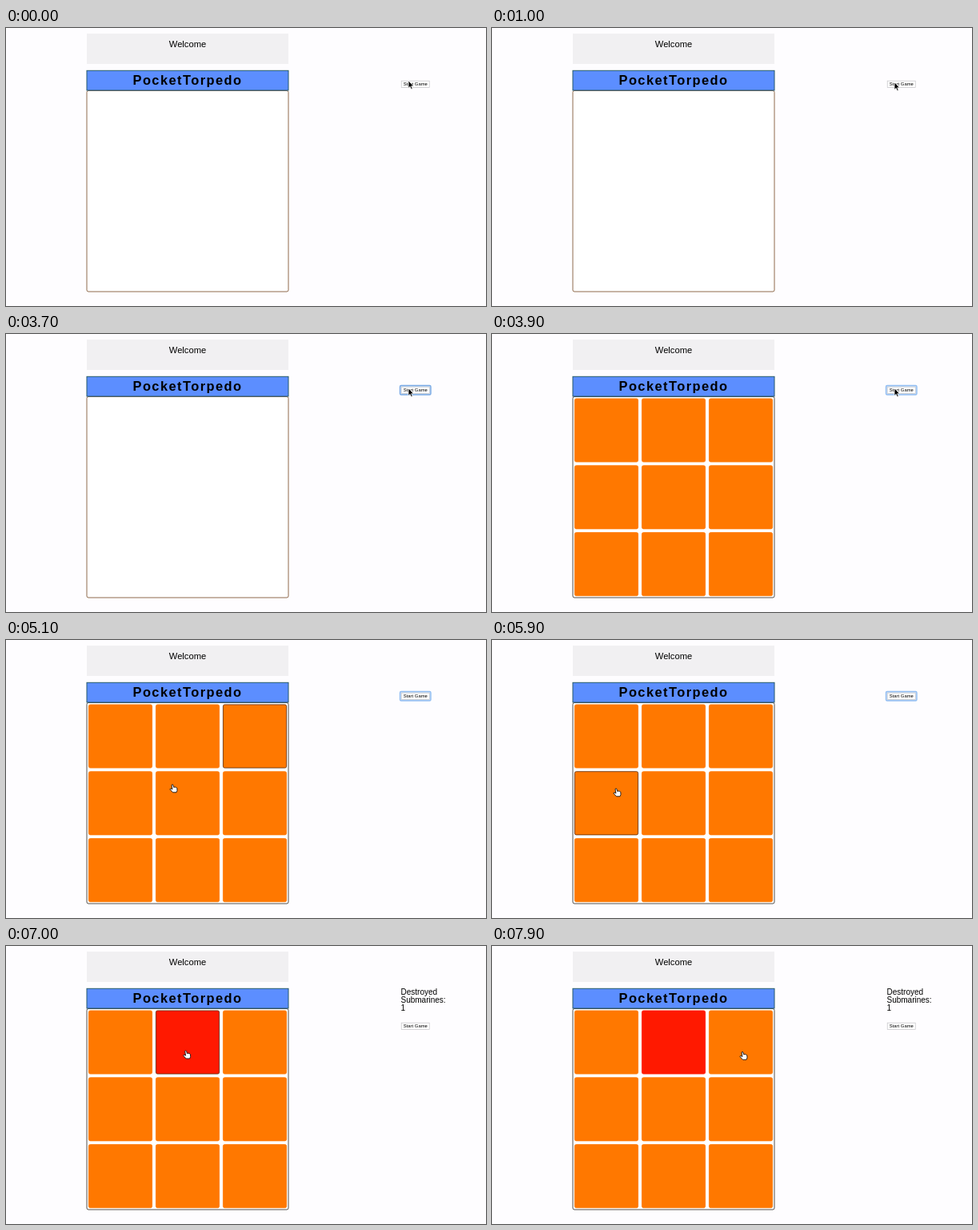
An HTML page for the animation above (8000 ms loop, 600 by 348 pixels).

```html
<!DOCTYPE html>
<html lang="en">
<head>
<meta charset="utf-8">
<title>Grid game</title>
<style>
html, body { margin: 0; width: 100%; height: 100%; overflow: hidden; background: #fefdff; }
svg { display: block; width: 600px; height: 348px; }
text { font-family: "Liberation Sans", Arial, sans-serif; fill: #000; }
</style>
</head>
<body>
<svg viewBox="0 0 600 348">
  <rect width="600" height="348" fill="#fefdff"/>
  <rect x="101" y="7" width="252" height="38" fill="#f1f0f2"/>
  <text x="227" y="24.4" font-size="11.2" text-anchor="middle">Welcome</text>
  <rect id="board" x="101" y="78.5" width="252" height="251.5" rx="2" fill="#fff"/>
  <rect x="101" y="53.3" width="252" height="24.7" fill="#5c8eff" stroke="#24596a"/>
  <text x="158.5" y="71" font-size="16.4" font-weight="bold" letter-spacing="1.45">PocketTorpedo</text>
  <g id="cells"></g>
  <g id="score" font-size="10">
    <text x="493.5" y="61">Destroyed</text>
    <text x="493.5" y="71">Submarines:</text>
    <text x="493.5" y="81">1</text>
  </g>
  <g id="button">
    <rect id="ring" x="492.5" y="64.5" width="38.5" height="11.5" rx="1.5" fill="#cfe2fa" stroke="#86b5ee" stroke-width="1.4"/>
    <rect x="494.2" y="66.2" width="35" height="8.2" fill="#fff" stroke="#c4c4c6" stroke-width=".7"/>
    <text x="511.8" y="72.4" font-size="5.9" text-anchor="middle">Start Game</text>
  </g>
  <path id="arrow" d="M0 0V9.2L2.1 7.3 3.5 10.6 5.1 9.9 3.7 6.7H6.5Z" fill="#000" stroke="#fff" stroke-width=".7"/>
  <path id="hand" d="M-1 .5Q0 -.7 1 .5L1.7 3.4 3.2 3 4.6 3.5 5.8 4.3 6 7.4 5 9.8H.5L-2.9 6.2Q-3.2 4.9 -1.9 5L-.1 6Z" fill="#fff" stroke="#111" stroke-width=".9" stroke-linejoin="round"/>
</svg>
<script>
const LOOP = 8000, STEP = 100;
const PRESS = 3700, START = 3900, HIT = 7000, HIT_CELL = 1;
const $ = id => document.getElementById(id);

// Pointer tip: time, x, y
const path = [
  [0, 503, 66], [200, 503, 69], [400, 503, 68], [4700, 503, 68],
  [4900, 420, 104], [5000, 316, 146], [5100, 208, 181],
  [5300, 214, 191], [5600, 216, 194], [5900, 155, 186],
  [6200, 159, 138], [6300, 160, 135.5], [6600, 162, 134],
  [6900, 224, 131], [7500, 228, 132], [7800, 269, 132], [7900, 313, 132.5]
];

const cells = Array.from({ length: 9 }, (_, i) => {
  const cell = document.createElementNS("http://www.w3.org/2000/svg", "rect");
  const box = { x: 103.4 + i % 3 * 84, y: 80.9 + Math.floor(i / 3) * 83.8, width: 79.2, height: 79.2, rx: 2 };
  for (const key in box) cell.setAttribute(key, box[key]);
  $("cells").append(cell);
  return { cell, box };
});

function pointer(t) {
  const i = path.findIndex(p => p[0] > t);
  if (i < 0) return path[path.length - 1].slice(1);
  const [t0, x0, y0] = path[i - 1], [t1, x1, y1] = path[i];
  const k = (t - t0) / (t1 - t0);
  return [x0 + (x1 - x0) * k, y0 + (y1 - y0) * k];
}

const inside = (x, y, b) => x >= b.x && x <= b.x + b.width && y >= b.y && y <= b.y + b.height;
const show = (id, on) => $(id).setAttribute("visibility", on ? "visible" : "hidden");

function draw(t) {
  const [x, y] = pointer(t);
  const [hx, hy] = pointer(Math.max(0, t - STEP)); // hover lags one step
  const playing = t >= START, hit = t >= HIT;
  const onBoard = x > 101 && x < 353 && y > 78 && y < 330;

  show("cells", playing);
  cells.forEach(({ cell, box }, i) => {
    const fill = hit && i === HIT_CELL ? "#ff1900" : "#ff7800";
    cell.setAttribute("fill", fill);
    cell.setAttribute("stroke", inside(hx, hy, box) ? "#5a2500" : fill);
    cell.setAttribute("stroke-width", .8);
  });
  $("board").setAttribute("stroke", playing ? "#55504c" : "#8f6a4c");

  show("score", hit);
  show("ring", t >= PRESS && !hit);
  $("ring").setAttribute("stroke", playing ? "#92bef2" : "#79a9e4");
  $("button").setAttribute("transform", `translate(0 ${hit ? 30 : 0})`);

  show("arrow", !onBoard);
  show("hand", onBoard);
  $(onBoard ? "hand" : "arrow").setAttribute("transform", `translate(${x} ${y})`);
}

const begin = performance.now();
function tick() {
  const t = (performance.now() - begin) % LOOP;
  draw(Math.floor(t / STEP) * STEP);
  requestAnimationFrame(tick);
}
tick();
</script>
</body>
</html>
```
